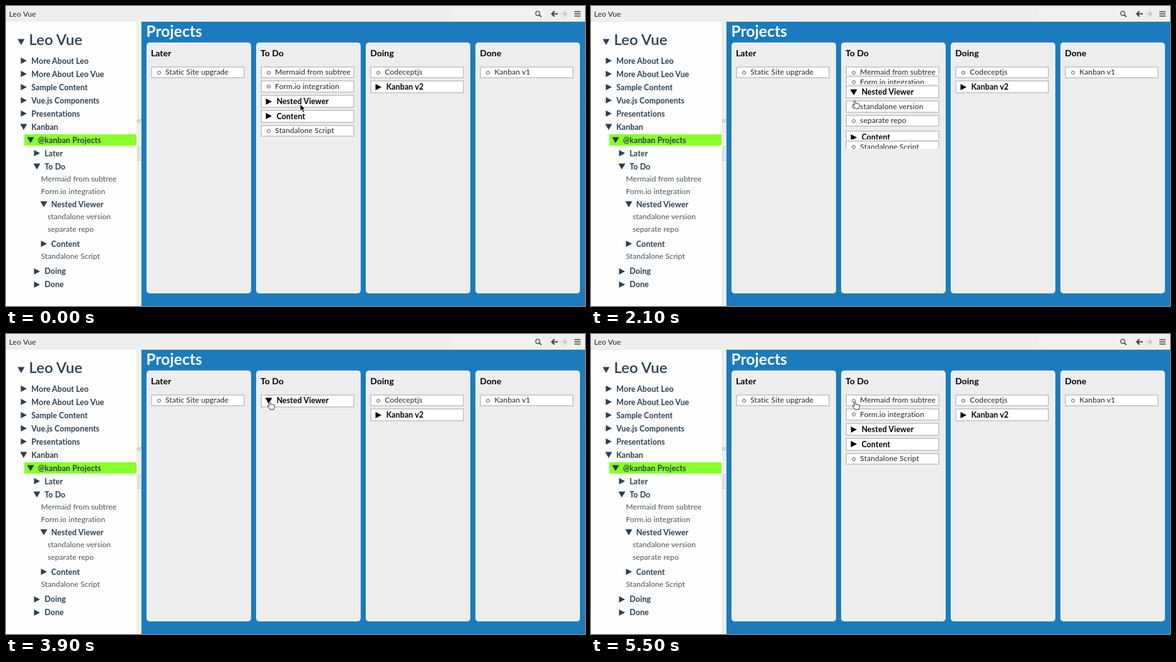
Write an HTML page that moves like this. It is 919x477 px and loops after 5.6 s.

```html
<!DOCTYPE html>
<html lang="en">
<head>
<meta charset="utf-8">
<title>Kanban outline</title>
<style>
  html, body { margin: 0; width: 100%; height: 100%; overflow: hidden; }
  body { position: relative; background: #fdfefd; font: 12px Lato, "Open Sans", sans-serif; color: #000; }
  body *, svg { position: absolute; }
  svg * { position: static; }
  .label { line-height: 20px; white-space: pre; letter-spacing: .1px; transform: translateY(-10px); }
  .plain { color: #222; }
  .bold { font-weight: 700; font-size: 12.4px; }
  .tri { width: 12px; height: 10px; margin: -5px 0 0 -6px; }
  .side { color: #2c3e50; }
  .leaf { color: #46505a; }
  .title { font-size: 23.8px; font-weight: 600; }
  .board-title { font-size: 24.3px; font-weight: 700; color: #fff; }
  .head { font-size: 13.8px; font-weight: 700; }

  #bar { left: 0; top: 0; width: 919px; height: 25px; background: #eee; }
  #field { left: 709px; top: 1px; width: 148px; height: 22px; border-radius: 11px; background: #f1f1f1; }
  #mark { left: 29px; top: 204px; width: 178px; height: 18px; background: #87ff2c; }
  #split { left: 207px; top: 25px; width: 8px; height: 452px; background: #eee; }
  #grip { left: 208px; top: 223px; width: 6px; height: 23px;
    background: radial-gradient(circle, #c4c4c4 .8px, transparent 1.1px) 0 0 / 2px 3px; }
  #board { left: 215px; top: 25px; width: 704px; height: 452px; background: #1c7bbd; }

  .column { top: 57.5px; width: 166.4px; height: 399.7px; border-radius: 5px; background: #ededed; }
  .list { left: 7.5px; top: 38.3px; width: 149px; }
  .slot { --h: 19.5px; --show: 1; position: relative; width: 149px; overflow: hidden;
    height: calc(var(--h) * var(--show)); margin-bottom: calc(3.2px * var(--show)); }
  .slot.tall { --h: 21px; margin-bottom: calc(2.8px * var(--show)); }
  .slot.sibling { --show: var(--siblings); }
  .card { box-sizing: border-box; width: 149px; height: var(--h); border: 2px solid #cdcdcd; background: #fff; }
  .ring { box-sizing: border-box; left: 9.8px; top: 7px; width: 6px; height: 6px; border: 1px solid #555; border-radius: 50%; }
  .kids { position: relative; overflow: hidden; height: calc(48.2px * var(--kids)); }
  #cursor { left: 0; top: 0; overflow: visible; }
</style>
</head>
<body>
<div id="bar"></div>
<div id="field"></div>
<div id="mark"></div>
<div id="split"></div>
<div id="grip"></div>
<div id="board"></div>
<svg width="919" height="477" fill="none" stroke="#444">
  <g stroke-width="1.3"><circle cx="844" cy="11.7" r="3.3"/><path d="M846.4 14.1l3.3 3.3" stroke-width="1.8"/></g>
  <path d="M876 12.5h-9M870.5 8.3l-4.2 4.2 4.2 4.2" stroke-width="2.2"/>
  <path d="M881 12.5h9M885.5 8.3l4.2 4.2-4.2 4.2" stroke="#c8c8c8" stroke-width="2.2"/>
  <path d="M902 9h10M902 12.5h10M902 16h10" stroke-width="1.7"/>
  <path d="M210.7 179.8l-2.4 2.7 2.4 2.7M214 179.8l-2.4 2.7 2.4 2.7" stroke="#777" stroke-width=".8"/>
</svg>
<svg id="cursor" width="20" height="20" stroke-linejoin="round">
  <path id="arrow" d="M0 0v11l2.6-2.3 1.9 4.2 2-.9-1.9-4.1H8z" fill="#000" stroke="#fff" stroke-width=".8"/>
  <path id="hand" d="M-1.6 1.2c0-1.6 2.2-1.6 2.4 0l.5 3.6c.4-.8 1.9-.8 2.1.2.5-.7 1.9-.5 2 .4.7-.4 1.8 0 1.8 1 .2 2.1-.2 3.6-1 4.7v1.5H.4C-.5 10.6-2.2 9.4-3.5 7.5c-.6-1 .6-2 1.6-1.2l1 .9z"
    fill="#fff" stroke="#222" stroke-width="1"/>
</svg>
<script>
const RIGHT = 'M1.5 0L11 5L1.5 10z';
const DOWN = 'M.5 .5H11.5L6 10z';

function add(parent, className, x, y) {
  const el = document.createElement('div');
  el.className = className;
  if (x !== undefined) { el.style.left = x + 'px'; el.style.top = y + 'px'; }
  parent.append(el);
  return el;
}

function label(parent, text, x, y, className = 'plain') {
  add(parent, 'label ' + className, x, y).textContent = text;
}

function triangle(parent, x, y, open, color) {
  const el = add(parent, 'tri', x, y);
  el.innerHTML = `<svg width="12" height="10"><path fill="${color}" d="${open ? DOWN : RIGHT}"/></svg>`;
  return el.querySelector('path');
}

// Returns the arrow of a tall card, so that it can be turned.
function card(parent, text, { tall = false, sibling = false } = {}) {
  const slot = add(parent, 'slot' + (tall ? ' tall' : '') + (sibling ? ' sibling' : ''));
  add(slot, 'card', 0, 0);
  if (tall) {
    label(slot, text, 25.3, 10.6, 'bold');
    return triangle(slot, 13, 10.5, false, '#000');
  }
  add(slot, 'ring');
  label(slot, text, 23, 9.5);
}

function column(index, title) {
  const el = add(document.body, 'column', 222.5 + 174.1 * index, 57.5);
  label(el, title, 7.5, 17, 'head');
  return add(el, 'list');
}

label(document.body, 'Leo Vue', 5, 12.7);
label(document.body, 'Projects', 222.5, 40.3, 'board-title');

triangle(document.body, 24, 57, true, '#2c3e50');
label(document.body, 'Leo Vue', 36.5, 52.7, 'title side');

// Outline rows: text, level, y, and whether the branch is open; leaves have no arrow.
const outline = [
  ['More About Leo', 0, 87.5, false],
  ['More About Leo Vue', 0, 108.5, false],
  ['Sample Content', 0, 129.5, false],
  ['Vue.js Components', 0, 150.5, false],
  ['Presentations', 0, 171.5, false],
  ['Kanban', 0, 192.5, true],
  ['@kanban Projects', 1, 213.5, true],
  ['Later', 2, 234.5, false],
  ['To Do', 2, 255.5, true],
  ['Mermaid from subtree', 3, 275],
  ['Form.io integration', 3, 294.5],
  ['Nested Viewer', 3, 315.5, true],
  ['standalone version', 4, 335],
  ['separate repo', 4, 354.5],
  ['Content', 3, 378.5, false],
  ['Standalone Script', 3, 398],
  ['Doing', 2, 422, false],
  ['Done', 2, 443, false]
];
for (const [text, level, y, open] of outline) {
  const x = 28.3 + 10.5 * level;
  if (open === undefined) {
    label(document.body, text, x - 4.3, y, 'leaf');
  } else {
    triangle(document.body, x, y - .5, open, '#2c3e50');
    label(document.body, text, x + 12, y, 'bold side');
  }
}

card(column(0, 'Later'), 'Static Site upgrade');

const todo = column(1, 'To Do');
card(todo, 'Mermaid from subtree', { sibling: true });
card(todo, 'Form.io integration', { sibling: true });
const toggle = card(todo, 'Nested Viewer', { tall: true });
const kids = add(todo, 'kids');
card(kids, 'standalone version');
card(kids, 'separate repo');
card(todo, 'Content', { tall: true, sibling: true });
card(todo, 'Standalone Script', { sibling: true });

const doing = column(2, 'Doing');
card(doing, 'Codeceptjs');
card(doing, 'Kanban v2', { tall: true });
card(column(3, 'Done'), 'Kanban v1');

const cursor = document.getElementById('cursor');
const arrow = document.getElementById('arrow');
const hand = document.getElementById('hand');
document.body.append(cursor);

const LOOP = 5600, STEP = 100;

function ramp(t, start, length = 400) {
  const p = Math.min(1, Math.max(0, (t - start) / length));
  return .5 - .5 * Math.cos(Math.PI * p);
}

function draw(t) {
  const style = document.body.style;
  style.setProperty('--kids', ramp(t, 1540) - ramp(t, 3450));
  style.setProperty('--siblings', 1 - ramp(t, 1945) + ramp(t, 4000));
  toggle.setAttribute('d', t >= 1600 && t < 4000 ? DOWN : RIGHT);

  const aside = ramp(t, 100, 800);
  const x = 467 - 48 * aside;
  const y = 156 - 5.5 * aside - 43 * ramp(t, 2800, 600);
  cursor.style.transform = `translate(${x}px, ${y}px)`;
  const pointing = t >= 1300;
  arrow.style.display = pointing ? 'none' : '';
  hand.style.display = pointing ? '' : 'none';
}

const begin = performance.now();
function tick() {
  const t = (performance.now() - begin) % LOOP;
  draw(Math.floor(t / STEP) * STEP);
  requestAnimationFrame(tick);
}
tick();
</script>
</body>
</html>
```
